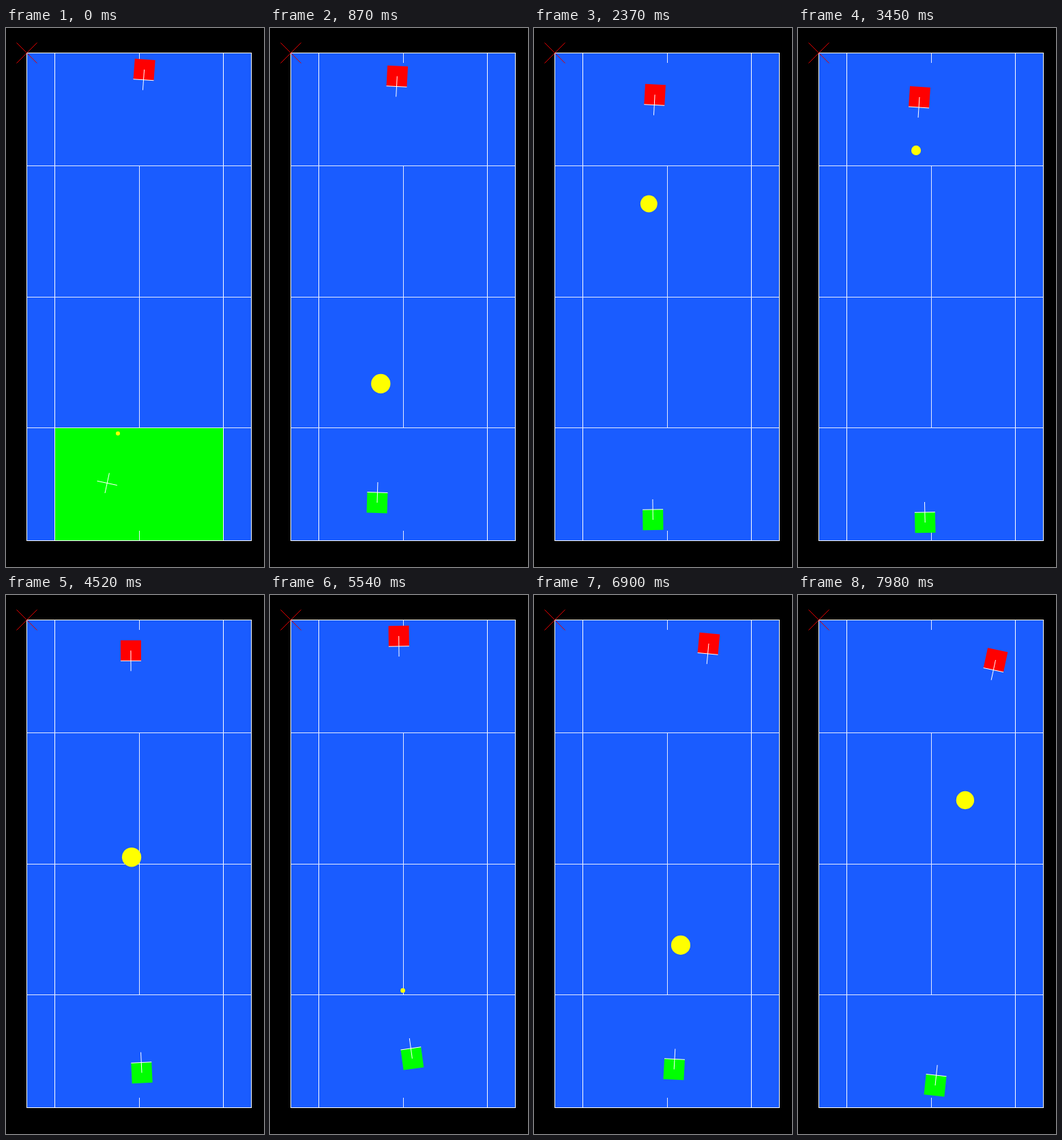
Recreate the animation shown at these times as an HTML page with a canvas. Size 378 by 788 pixels, loop 8 s.

```html
<!DOCTYPE html>
<html lang="en">
<head>
<meta charset="utf-8">
<title>Court</title>
<style>
  html, body { margin: 0; width: 100%; height: 100%; overflow: hidden; background: #000; }
  canvas { display: block; }
</style>
</head>
<body>
<canvas id="court" width="378" height="788"></canvas>
<script>
const ctx = document.getElementById('court').getContext('2d');
const LOOP = 8000;
const LOW = 3;       // ball radius at a hit or bounce
const ARC = 8.2e-6;  // growth of the ball in flight

const COURT = { left: 30, top: 36, right: 359, bottom: 749 };
const ALLEY = 41, SERVICE = 165, TICK = 15;
const MID = 195, NET = 393;

const key = (t, x, y) => ({ t, x, y });

// Hits and bounces, joined by straight flights
const ballPath = [
  key(-10, 164.2, 590.5), key(200, 159.6, 637.5),
  key(2900, 170.4, 164), key(3215, 170.6, 134),
  key(5560, 194.8, 582), key(6130, 193.6, 663),
  key(8650, 263.5, 168.5)
];

// Places the players run through
const greenPath = [
  key(0, 145, 680), key(870, 157, 694), key(2370, 174.3, 719),
  key(3450, 186.2, 723), key(5540, 208.4, 677.7),
  key(6900, 205.2, 693.5), key(7980, 201, 717)
];
const redPath = [
  key(0, 202.6, 60.8), key(400, 194, 58), key(870, 186.3, 70.5),
  key(2370, 177.1, 97.5), key(3450, 178, 101), key(5540, 188.7, 60),
  key(6000, 193, 57.5), key(6900, 256, 71), key(7980, 289.5, 95)
];

function segment(path, t) {
  let i = 0;
  while (i < path.length - 2 && t >= path[i + 1].t) i++;
  return i;
}

// Smooth curve through the keys
function follow(path, t) {
  const i = segment(path, t);
  const a = path[i], b = path[i + 1];
  const before = path[i - 1] || a, after = path[i + 2] || b;
  const span = b.t - a.t;
  const u = (t - a.t) / span, v = 1 - u;
  const ease = u * u * (3 - 2 * u);
  const along = k => {
    const ma = (b[k] - before[k]) / (b.t - before.t) * span;
    const mb = (after[k] - a[k]) / (after.t - a.t) * span;
    return a[k] + (b[k] - a[k]) * ease + u * v * (v * ma - u * mb);
  };
  return { x: along('x'), y: along('y') };
}

function ballAt(t) {
  const i = segment(ballPath, t);
  const a = ballPath[i], b = ballPath[i + 1];
  const u = (t - a.t) / (b.t - a.t);
  return {
    x: a.x + (b.x - a.x) * u,
    y: a.y + (b.y - a.y) * u,
    r: LOW + ARC * (t - a.t) * (b.t - t)
  };
}

function box(color, x, y, w, h) {
  ctx.fillStyle = color;
  ctx.fillRect(x, y, w, h);
}

function line(color, x1, y1, x2, y2) {
  ctx.strokeStyle = color;
  ctx.lineWidth = 1;
  ctx.beginPath();
  ctx.moveTo(x1, y1);
  ctx.lineTo(x2, y2);
  ctx.stroke();
}

function drawCourt(lit) {
  const { left, top, right, bottom } = COURT;
  const w = right - left + 1, h = bottom - top + 1;
  const near = bottom - SERVICE, far = top + SERVICE;
  const inner = left + ALLEY, outer = right - ALLEY;

  box('#000', 0, 0, 378, 788);
  box('#1a5cff', left, top, w, h);
  if (lit) box('#0f0', inner, near, outer - inner + 1, SERVICE);

  for (const x of [left, inner, outer, right]) box('#fff', x, top, 1, h);
  for (const y of [top, bottom]) box('#fff', left, y, w, 1);
  for (const y of [far, NET, near]) box('#e6ebff', left, y, w, 1);
  box('#e6ebff', MID, far, 1, near - far);
  box('#e6ebff', MID, top, 1, TICK);
  box('#e6ebff', MID, bottom - TICK + 1, 1, TICK);

  const cx = left + 0.5, cy = top + 0.5;
  for (const s of [-1, 1]) line('#e00000', cx - 15, cy - 15 * s, cx + 15, cy + 15 * s);
}

// A player always turns its front edge and pointer to the ball
function drawPlayer(color, { x, y }, ball) {
  ctx.save();
  ctx.translate(x, y);
  ctx.rotate(Math.atan2(ball.x - x, y - ball.y));
  box(color, -15, -15, 30, 30);
  line('#fff', -15, -15, 15, -15);
  line('#fff', 0, 0, 0, -30);
  ctx.restore();
}

function drawBall({ x, y, r }) {
  ctx.fillStyle = '#ff0';
  ctx.beginPath();
  ctx.arc(x, y, r, 0, Math.PI * 2);
  ctx.fill();
}

let start;
function frame(now) {
  start ??= now;
  const t = (now - start) % LOOP;
  const ball = ballAt(t);
  drawCourt(t < 50 || (t >= 5560 && t < 5680));
  drawPlayer('#f00', follow(redPath, t), ball);
  drawPlayer('#0f0', follow(greenPath, t), ball);
  drawBall(ball);
  requestAnimationFrame(frame);
}
requestAnimationFrame(frame);
</script>
</body>
</html>
```
